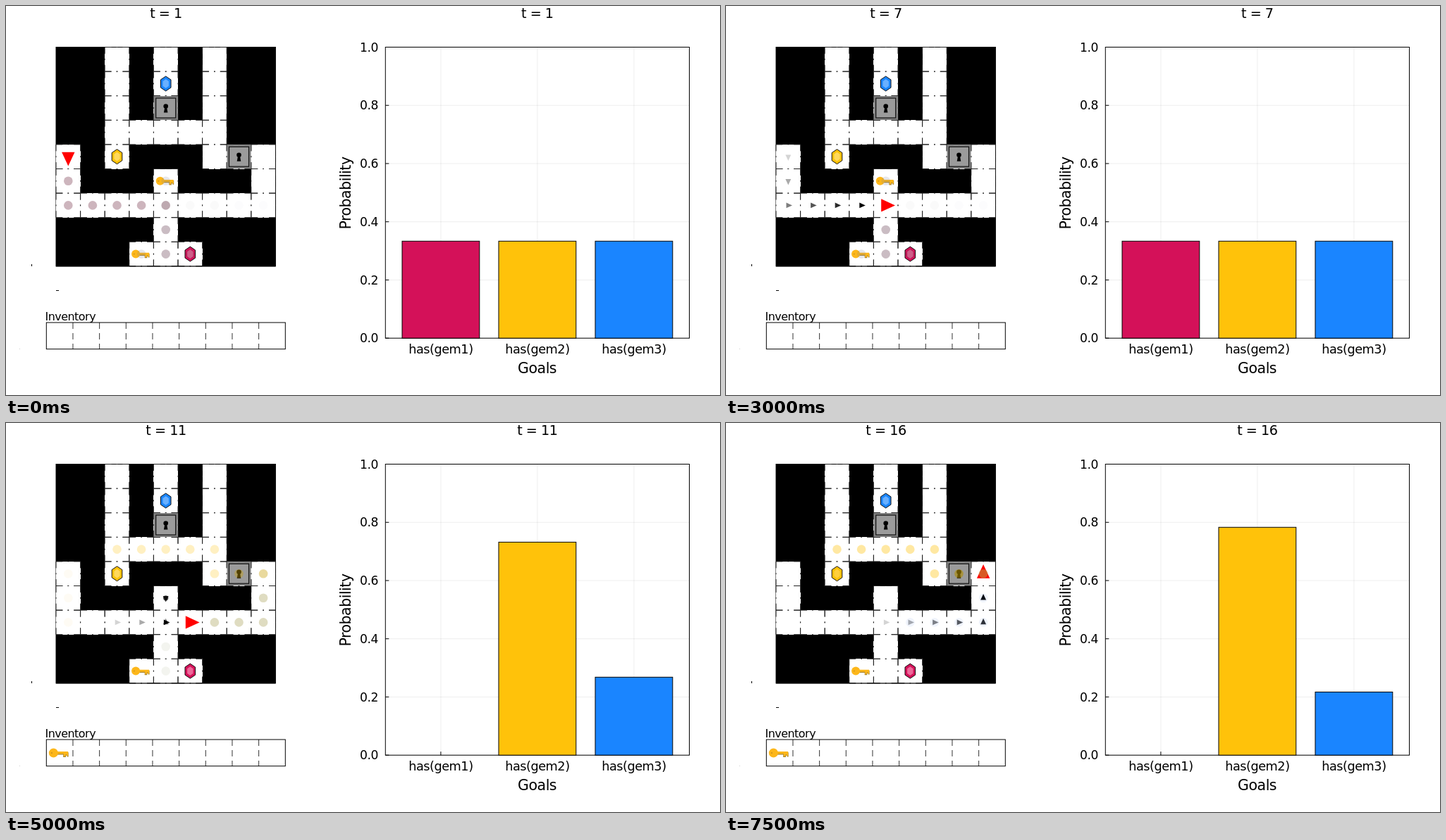
These frames come from a looping animation (1013x553 px, 8 s). An HTML page:

```html
<!DOCTYPE html>
<html lang="en">
<head>
<meta charset="utf-8">
<title>Goal inference in a gridworld</title>
<style>
  html, body { margin: 0; width: 100%; height: 100%; overflow: hidden; background: #fff; }
  svg { display: block; width: 1013px; height: 553px; font-family: "DejaVu Sans", sans-serif; letter-spacing: -.03em; }
</style>
</head>
<body>
<svg id="stage" viewBox="0 0 1013 553" xmlns="http://www.w3.org/2000/svg">
  <g id="board"></g><g id="trail"></g><g id="items"></g><g id="overlay"></g><g id="chart"></g><g id="labels"></g>
</svg>
<script>
const STEP = 500, STEPS = 16, CELL = 34.6, LEFT = 71, TOP = 58.5;
const MAZE = [
  '##.#.#.##',
  '##.#.#.##',
  '##.#.#.##',
  '##.....##',
  '.#.###...',
  '.###.###.',
  '.........',
  '####.####',
  '###...###'
];
const PATH = '04 05 06 16 26 36 46 45 45 46 56 66 76 86 85 84'.split(' ');
const MOVES = 'DDRRRRU.DRRRRUU'; // action taken when leaving each position
const ANGLE = { R: 0, D: 90, L: 180, U: 270 };
const GEMS = [['58', '#d41159', '#ee6a9b'], ['24', '#ffc20a', '#ffd95c'], ['41', '#1a85ff', '#69b0ff']];
const COLORS = GEMS.map(g => g[1]);

// First step of each setting, then the goal probabilities.
const BELIEFS = [
  [1, 1 / 3, 1 / 3, 1 / 3], [8, 0, .647, .353], [9, 0, .655, .345],
  [11, 0, .732, .268], [12, 0, .786, .214], [15, 0, .783, .217]
];

// First step, then groups of cells with the tint of their planned-path dots.
const ROW3 = '23 33 43 53 63';
const GOLD = 'rgba(255,194,10,.38)', OLIVE = 'rgba(135,130,33,.4)';
const PLANS = [
  [1, ['05 06 16 26 36', 'rgba(123,60,81,.38)'], ['46', 'rgba(110,65,80,.45)'],
      ['47 48', 'rgba(115,80,98,.38)'], ['58', 'rgba(110,60,80,.25)'],
      ['56 66', 'rgba(90,90,110,.03)'], ['76 86', 'rgba(90,90,110,.015)'],
      ['45 38', 'rgba(130,130,150,.2)']],
  [8, [ROW3 + ' 64 85', 'rgba(220,190,90,.06)'], ['04 84', 'rgba(245,190,50,.11)'],
      ['05 06 16 26 36', 'rgba(150,160,110,.15)'], ['46', 'rgba(140,145,100,.35)'],
      ['45', 'rgba(150,130,70,.55)'], ['56 66 76 86', 'rgba(170,170,130,.08)'],
      ['47 48 38', 'rgba(140,140,90,.17)']],
  [9, [ROW3 + ' 64 04 05 06 85 66 76 86', 'rgba(230,200,70,.11)'], ['84', 'rgba(240,190,50,.18)'],
      ['16 26 36 47 48', 'rgba(140,145,95,.23)'], ['56', 'rgba(170,155,100,.14)'],
      ['38', 'rgba(140,145,95,.15)']],
  [11, [ROW3 + ' 64', 'rgba(255,194,10,.25)'], ['84 74', 'rgba(200,160,10,.4)'],
      ['66 76 86 85', 'rgba(150,140,50,.3)'], ['47 48', 'rgba(140,145,95,.1)'],
      ['04 05 06', 'rgba(245,190,70,.06)']],
  [12, [ROW3 + ' 64 24', GOLD], ['74', 'rgba(175,140,0,.6)'],
      ['84', 'rgba(148,130,0,.6)'], ['76 86 85', OLIVE]],
  [16, [ROW3 + ' 64 24', GOLD], ['74', 'rgba(175,140,0,.6)'],
      ['84', 'rgba(190,150,60,.6)'], ['56 66 76 86 85', 'rgba(90,130,220,.09)']]
];

const $ = id => document.getElementById(id);
const at = (table, t) => table.filter(row => row[0] <= t).pop().slice(1);
const center = cell => [LEFT + CELL * (+cell[0] + .5), TOP + CELL * (+cell[1] + .5)];
const place = (cell, body) => `<g transform="translate(${center(cell)})">${body}</g>`;
const rect = (x, y, w, h, rest) => `<rect x="${x}" y="${y}" width="${w}" height="${h}" ${rest}/>`;
const line = (x1, y1, x2, y2, rest = 'stroke="#000"') => `<path d="M${x1} ${y1}L${x2} ${y2}" fill="none" ${rest}/>`;
const text = (x, y, size, str, rest = 'text-anchor="middle"') => `<text x="${x}" y="${y}" font-size="${size}" ${rest}>${str}</text>`;
const circle = (r, rest) => `<circle r="${r}" ${rest}/>`;

const hexagon = (w, h, rest) => {
  const s = h * .53;
  return `<path d="M0 ${-h}L${w} ${-s}V${s}L0 ${h}L${-w} ${s}V${-s}Z" ${rest}/>`;
};
const gem = ([cell, outer, inner]) => place(cell,
  hexagon(7.3, 10.5, `fill="${outer}" stroke="#111" stroke-width="1"`) + hexagon(4.2, 6.4, `fill="${inner}"`));

const key = `<path d="M-3 -.6H11.5V5H9.6V3.4H8.2V5.6H4.6V2.4H-3Z" fill="#a8842e"/>
  <path d="M-3 -1.8H11V3.8H9.4V2.2H7.6V4.4H5.2V1.2H-3Z" fill="#fdb71a"/>
  <circle cx="-8" r="6" fill="#fdb71a"/><circle cx="-10.3" r="1.1" fill="#d69a1c"/>`;

const door = rect(-17, -17, 34, 34, 'fill="#808080"')
  + rect(-14, -14, 28, 28, 'fill="#9b9b9b" stroke="#111" stroke-width="1.2"')
  + '<circle cy="-2.4" r="3.3"/><path d="M-1.4 -1H1.4L2.8 6.5H-2.8Z"/>';

const marker = (move, scale, color, alpha = 1) => {
  const rest = `fill="${color}" fill-opacity="${alpha}"`;
  return move === '.' ? circle(8.5 * scale, rest)
    : `<path transform="rotate(${ANGLE[move]}) scale(${scale})" d="M-6.5 -9.2L13.3 0L-6.5 9.2Z" ${rest}/>`;
};

function drawBoard() {
  const size = CELL * 9;
  let out = rect(LEFT, TOP, size, size, 'stroke="#000"'), dashes = '';
  MAZE.forEach((row, r) => [...row].forEach((kind, c) => {
    if (kind === '#') return;
    const x = LEFT + c * CELL, y = TOP + r * CELL;
    out += rect(x, y, CELL, CELL, 'fill="#fff" shape-rendering="crispEdges"');
    dashes += `M${x} ${y}h${CELL}M${x} ${y + CELL}h${CELL}M${x} ${y}v${CELL}M${x + CELL} ${y}v${CELL}`;
  }));
  out += `<path d="${dashes}" fill="none" stroke="#222" stroke-dasharray="9.4 7 1.8 7 9.4 0"/>`;
  out += line(LEFT, TOP + size, LEFT + size, TOP + size);
  out += line(36.5, 367, 36.5, 370) + line(71, 404.5, 75, 404.5) + line(19, 487.5, 20, 487.5, 'stroke="#ccc"');

  out += text(55.5, 446.7, 15.9, 'Inventory', '');
  const slot = 339 / 9;
  for (let i = 1; i < 9; i++)
    out += line(57.3 + i * slot, 450, 57.3 + i * slot, 488, 'stroke="#333" stroke-dasharray="9 6"');
  out += rect(57.3, 450, 339, 37.7, 'fill="none" stroke="#000"');
  $('board').innerHTML = out;
}

const AXIS = { x0: 538.3, x1: 969.5, y0: 472.2, y1: 58.5 };
const valueY = p => AXIS.y0 + (AXIS.y1 - AXIS.y0) * p;
const barX = i => 616.9 + 137 * i;

function drawAxes() {
  const { x0, x1, y0, y1 } = AXIS;
  let grid = '', ticks = '';
  for (let i = 0; i <= 5; i++) {
    const y = valueY(i / 5);
    grid += line(x0, y, x1, y, 'stroke="#000" stroke-opacity=".07"');
    ticks += line(x0, y, x0 + 5, y) + text(528, y + 6.2, 17.2, (i / 5).toFixed(1), 'text-anchor="end"');
  }
  for (let i = 0; i < 3; i++) {
    const x = barX(i);
    grid += line(x, y0, x, y1, 'stroke="#000" stroke-opacity=".07"');
    ticks += line(x, y0, x, y0 - 5) + text(x, 493.6, 17.7, `has(gem${i + 1})`);
  }
  return grid + rect(x0, y1, x1 - x0, y0 - y1, 'fill="none" stroke="#000"') + ticks
    + text(753.6, 522, 20.5, 'Goals')
    + text(0, 0, 20.5, 'Probability', 'text-anchor="middle" transform="translate(488.5 266) rotate(-90)"');
}

function drawStep(t) {
  const now = t - 1, here = PATH[now];
  let trail = '';
  const first = Math.max(0, now - 6);
  for (let i = first; i < now; i++)
    trail += place(PATH[i], marker(MOVES[i], .43, '#000', (i - first + 1) / (now - first)));
  $('trail').innerHTML = trail;

  const taken = t >= 9;
  $('items').innerHTML = GEMS.map(gem).join('')
    + place('42', door) + place('74', door) + place('38', key)
    + (taken ? `<g transform="translate(76.1 469) scale(1.09)">${key}</g>` : place('45', key))
    + place(here, marker(now ? MOVES[now - 1] : 'D', 1, '#f00'));

  const passed = PATH.slice(t >= 12 ? 9 : 0, t);
  const hidden = cell => (t < 8 || (t >= 12 && t < 16)) && passed.includes(cell);
  $('overlay').innerHTML = at(PLANS, t).map(([cells, tint]) => cells.split(' ')
    .filter(cell => !hidden(cell))
    .map(cell => place(cell, circle(6.3, `fill="${tint}"`))).join('')).join('');

  $('chart').innerHTML = axes + at(BELIEFS, t).map((p, i) =>
    rect(barX(i) - 54.9, valueY(p), 109.8, AXIS.y0 - valueY(p), `fill="${COLORS[i]}" stroke="#000"`)).join('');
  $('labels').innerHTML = [227, 753.8].map(x => text(x, 16.9, 19.2, `t = ${t}`)).join('');
}

const axes = drawAxes();
drawBoard();
let shown = 0;
const start = performance.now();
function tick() {
  const t = 1 + Math.floor((performance.now() - start) / STEP) % STEPS;
  if (t !== shown) drawStep(shown = t);
  requestAnimationFrame(tick);
}
tick();
</script>
</body>
</html>
```
